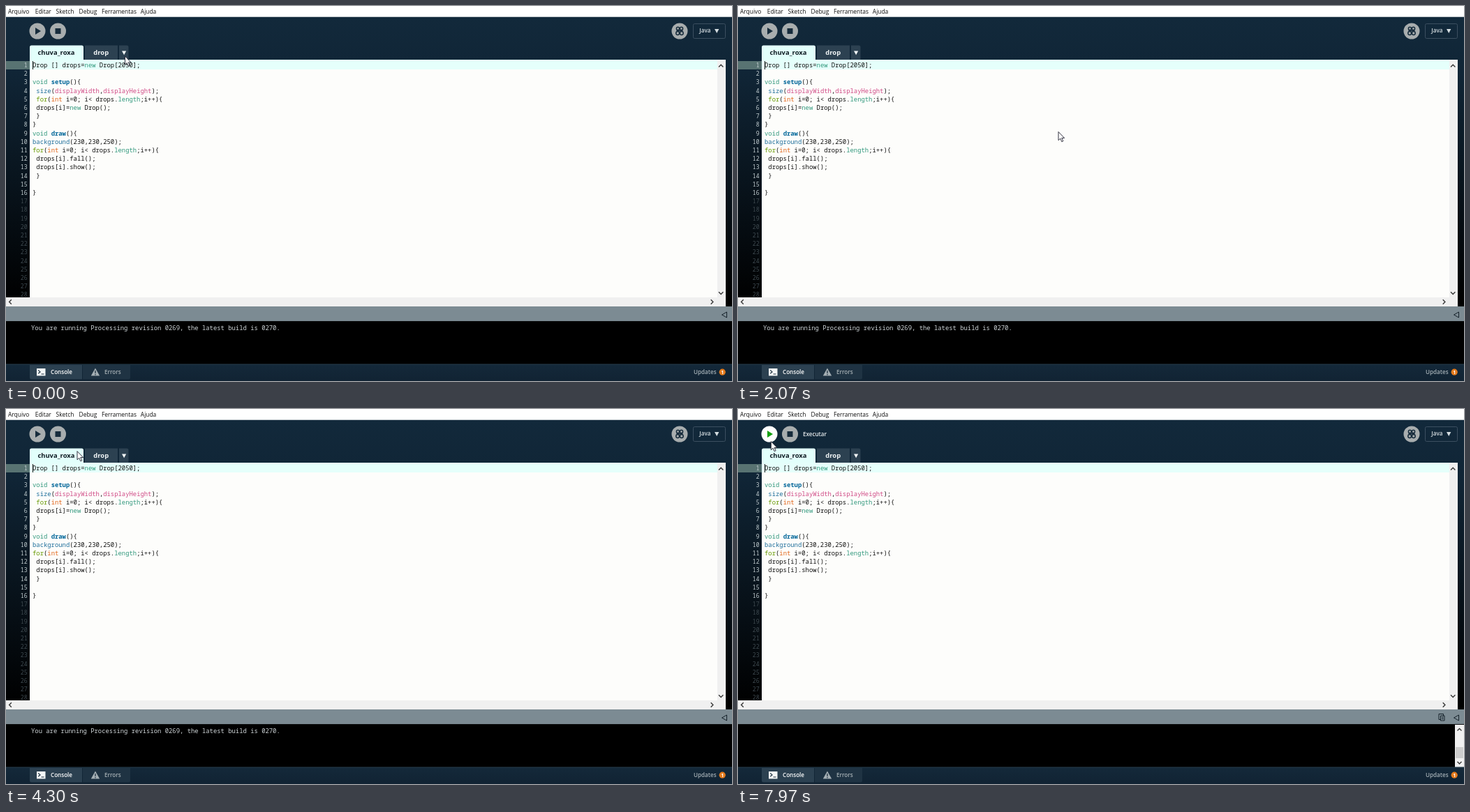
An HTML page that plays this animation: 1040x538 px, repeating every 8 s.

```html
<!DOCTYPE html>
<html lang="pt">
<head>
<meta charset="utf-8">
<title>chuva_roxa</title>
<style>
html, body { margin: 0; width: 100%; height: 100%; overflow: hidden; background: #000; }
svg { display: block; width: 100%; height: 100%; }
text { font-family: "Open Sans", "Noto Sans", sans-serif; white-space: pre; }
.menu { font-size: 8.45px; fill: #111; }
.tab { font-size: 9.44px; font-weight: 700; }
.ui { font-size: 8.1px; font-weight: 600; }
.mono, .mono tspan { font-family: "Noto Sans Mono", "DejaVu Sans Mono", monospace; }
.mono { font-size: 8.88px; }
.number { font-size: 8.2px; text-anchor: end; }
.type { fill: #33997e; }
.entry { fill: #006699; font-weight: 700; }
.call { fill: #1f6f9b; }
.screen { fill: #d04a86; }
.loop { fill: #669900; }
.int { fill: #e2661a; }
.chevron { fill: none; stroke: #383838; stroke-width: 1.4; }
</style>
</head>
<body>
<svg viewBox="0 0 1040 538" preserveAspectRatio="none">
  <defs>
    <linearGradient id="shade" gradientUnits="userSpaceOnUse" x1="0" y1="16" x2="0" y2="425">
      <stop offset="0" stop-color="#12293b"/>
      <stop offset=".2" stop-color="#102536"/>
      <stop offset="1" stop-color="#000"/>
    </linearGradient>
    <linearGradient id="footer" x2="0" y2="1">
      <stop offset="0" stop-color="#14293a"/>
      <stop offset="1" stop-color="#112333"/>
    </linearGradient>
  </defs>

  <rect width="1040" height="538" fill="url(#shade)"/>
  <rect width="1040" height="15.7" fill="#fff"/>
  <g id="menu" class="menu"></g>

  <!-- toolbar -->
  <g fill="#a8adae">
    <circle id="play" cx="45" cy="36" r="11.5"/>
    <circle cx="74.5" cy="36" r="11.5"/>
    <circle cx="965" cy="36" r="11.5"/>
  </g>
  <path id="playIcon" d="M42 31L50 36L42 41Z" fill="#172c3c"/>
  <path d="M70.5 32h8v8h-8z" fill="#172c3c"/>
  <g fill="none" stroke="#172c3c" stroke-width="1.5">
    <circle cx="962.5" cy="32.4" r="2.1"/><circle cx="967.5" cy="32.4" r="2.1"/>
    <circle cx="962.2" cy="39" r="2.4"/><circle cx="967.8" cy="39" r="2.4"/>
    <path d="M960.5 35.6h9"/>
  </g>
  <text id="hint" class="ui" x="93" y="38.7" fill="#e6ebed">Executar</text>
  <rect x="984.5" y="25.5" width="46" height="21" rx="2" fill="none" stroke="#3c4f60"/>
  <text class="ui" x="993.3" y="38.4" fill="#d5dde1">Java</text>
  <path d="M1015 33h6.4l-3.2 6z" fill="#d5dde1"/>

  <!-- tabs -->
  <path d="M34 78V59q0-2.5 2.5-2.5H108.5q2.5 0 2.5 2.5V78z" fill="#e2fffb"/>
  <path d="M113 77V56.5H160V77zM162 77V56.5H173q2.5 0 2.5 2.5V77z" fill="#2c4151"/>
  <text class="tab" x="45.4" y="70.2" fill="#101c24">chuva_roxa</text>
  <text class="tab" x="125.3" y="70.2" fill="#f2f6f7">drop</text>
  <path d="M166 64.5h6.2l-3.1 5.8z" fill="#f2f6f7"/>

  <!-- editor -->
  <rect x="34" y="77" width="985" height="341" fill="#fdfdfb"/>
  <rect x="34" y="77" width="985" height="14" fill="#e5fffb"/>
  <rect y="79" width="34" height="12" fill="#587372"/>
  <g id="code"></g>
  <rect id="caret" x="38" y="79" width="1" height="12" fill="#111"/>
  <path d="M1019 77h12V431H0V418H1019z" fill="#f0f0f0"/>
  <path class="chevron" d="M1021 87.5l3.2-3.2 3.2 3.2M1021 410.3l3.2 3.2 3.2-3.2M7.8 421.3l-3.2 3.2 3.2 3.2M1009.7 421.3l3.2 3.2-3.2 3.2"/>

  <!-- status bar and console -->
  <rect y="431" width="1040" height="21.3" fill="#7c8b93"/>
  <path d="M1032.5 439v8l-7-4z" fill="none" stroke="#16222b"/>
  <rect y="452.3" width="1040" height="61.7" fill="#000"/>
  <text id="message" class="mono" x="36" y="465" fill="#cfd5d8">You are running Processing revision 0269, the latest build is 0270.</text>
  <g id="consoleTools">
    <path d="M1004 437.5h6.5v3M1004 437.5v8h2.5M1006.5 440h5.5v7h-5.5zM1008 442.3h2.6M1008 444.5h2.6" fill="none" stroke="#16222b"/>
    <rect x="1027" y="453" width="13" height="61" fill="#f0f0f0"/>
    <rect x="1028" y="485" width="11" height="16" fill="#cdcdcd"/>
    <path class="chevron" d="M1030.5 461.5l3-3 3 3M1030.5 506l3 3 3-3"/>
  </g>

  <!-- footer -->
  <rect y="514" width="1040" height="24" fill="url(#footer)"/>
  <rect y="513.5" width="1040" height="1" fill="#263c4b"/>
  <path d="M34 515H109V535.5H36.5q-2.5 0-2.5-2.5z" fill="#2c4151"/>
  <path d="M110 515H178V533q0 2.5-2.5 2.5H110z" fill="#1f3343"/>
  <rect x="44" y="520" width="12.5" height="10.5" fill="#f4f8f8"/>
  <path d="M46.2 522.5l2.8 2.4-2.8 2.4M50.5 528h4" fill="none" stroke="#1c2f3e" stroke-width="1.2"/>
  <text class="ui" x="64" y="528.2" fill="#fff">Console</text>
  <path d="M128 519.5l6.2 11h-12.4z" fill="#a5afb4"/>
  <path d="M128 523v4M128 528v1.4" stroke="#1f3343" stroke-width="1.3"/>
  <text class="ui" x="141" y="528.2" fill="#a5afb4">Errors</text>
  <text class="ui" x="985" y="528.2" fill="#a5b0b6">Updates</text>
  <circle cx="1026.2" cy="525.2" r="4.6" fill="#e47a1c"/>
  <text x="1026.2" y="527.8" font-size="7" font-weight="700" text-anchor="middle" fill="#fff">1</text>

  <!-- pointers, hot spot at 0,0 -->
  <path id="arrow" d="M0 0V12.2L2.8 9.6L4.8 14.2L6.8 13.3L4.8 8.9H8.6Z" fill="#fff" stroke="#1c1c2c" stroke-width=".9"/>
  <path id="beam" d="M-3-5.5H-1Q0-5.5 0-4.5Q0-5.5 1-5.5H3M0-5V5M-3 5.5H-1Q0 5.5 0 4.5Q0 5.5 1 5.5H3" fill="none" stroke="#111" stroke-width="1.1"/>
</svg>

<script>
const LOOP = 8000, HOVER = 4680, CLICK = 4900;
const $ = id => document.getElementById(id);
const show = (id, on) => $(id).setAttribute("visibility", on ? "visible" : "hidden");

const menu = { Arquivo: 3, Editar: 41.7, Sketch: 71.6, Debug: 104.5, Ferramentas: 137, Ajuda: 192.8 };
$("menu").innerHTML = Object.entries(menu)
  .map(([label, x]) => `<text x="${x}" y="10.6">${label}</text>`).join("");

const source = `Drop [] drops=new Drop[2050];

void setup(){
 size(displayWidth,displayHeight);
 for(int i=0; i< drops.length;i++){
 drops[i]=new Drop();
 }
}
void draw(){
background(230,230,250);
for(int i=0; i< drops.length;i++){
 drops[i].fall();
 drops[i].show();
 }

}`.split("\n");

const styles = {
  void: "type", new: "type", length: "type", setup: "entry", draw: "entry",
  size: "call", background: "call", displayWidth: "screen", displayHeight: "screen",
  for: "loop", int: "int"
};
const highlight = line => line.replace(/</g, "&lt;").replace(/\w+/g, word =>
  styles[word] ? `<tspan class="${styles[word]}">${word}</tspan>` : word);

let rows = "";
for (let i = 0; i < 28; i++) {
  const y = 88 + 12.2 * i, used = i < source.length;
  rows += `<text class="mono number" x="30.6" y="${y}" fill="${used ? "#c3ced1" : "#3f4a50"}">${i + 1}</text>`;
  if (used) rows += `<text class="mono" x="38" y="${y}" fill="#111">${highlight(source[i])}</text>`;
}
$("code").innerHTML = rows;

// time, x, y of the pointer's rests
const path = [
  [0, 170.5, 72], [460, 170.5, 72], [830, 456.5, 180.5], [1240, 459, 180.5],
  [2750, 459, 180.5], [3530, 239.5, 96], [4720, 47.3, 46.5], [LOOP, 47.3, 46.5]
];

function pointerAt(t) {
  const i = path.findIndex(p => p[0] > t);
  const [t0, x0, y0] = path[i - 1], [t1, x1, y1] = path[i];
  const u = (t - t0) / (t1 - t0), k = u * u * (3 - 2 * u);
  return [x0 + (x1 - x0) * k, y0 + (y1 - y0) * k];
}

function draw(t) {
  const [x, y] = pointerAt(t);
  const overText = t > 2750 && y > 77;
  for (const id of ["arrow", "beam"]) $(id).setAttribute("transform", `translate(${x} ${y})`);
  show("arrow", !overText);
  show("beam", overText);
  show("caret", (t + 40) % 1000 < 500);

  const hovering = t >= HOVER, running = t >= CLICK;
  $("play").setAttribute("fill", hovering ? "#fff" : "#a8adae");
  $("playIcon").setAttribute("fill", hovering ? "#14a012" : "#172c3c");
  show("hint", hovering);
  show("message", !running);
  show("consoleTools", running);
}

const start = performance.now();
function tick() {
  draw((performance.now() - start) % LOOP);
  requestAnimationFrame(tick);
}
tick();
</script>
</body>
</html>
```
